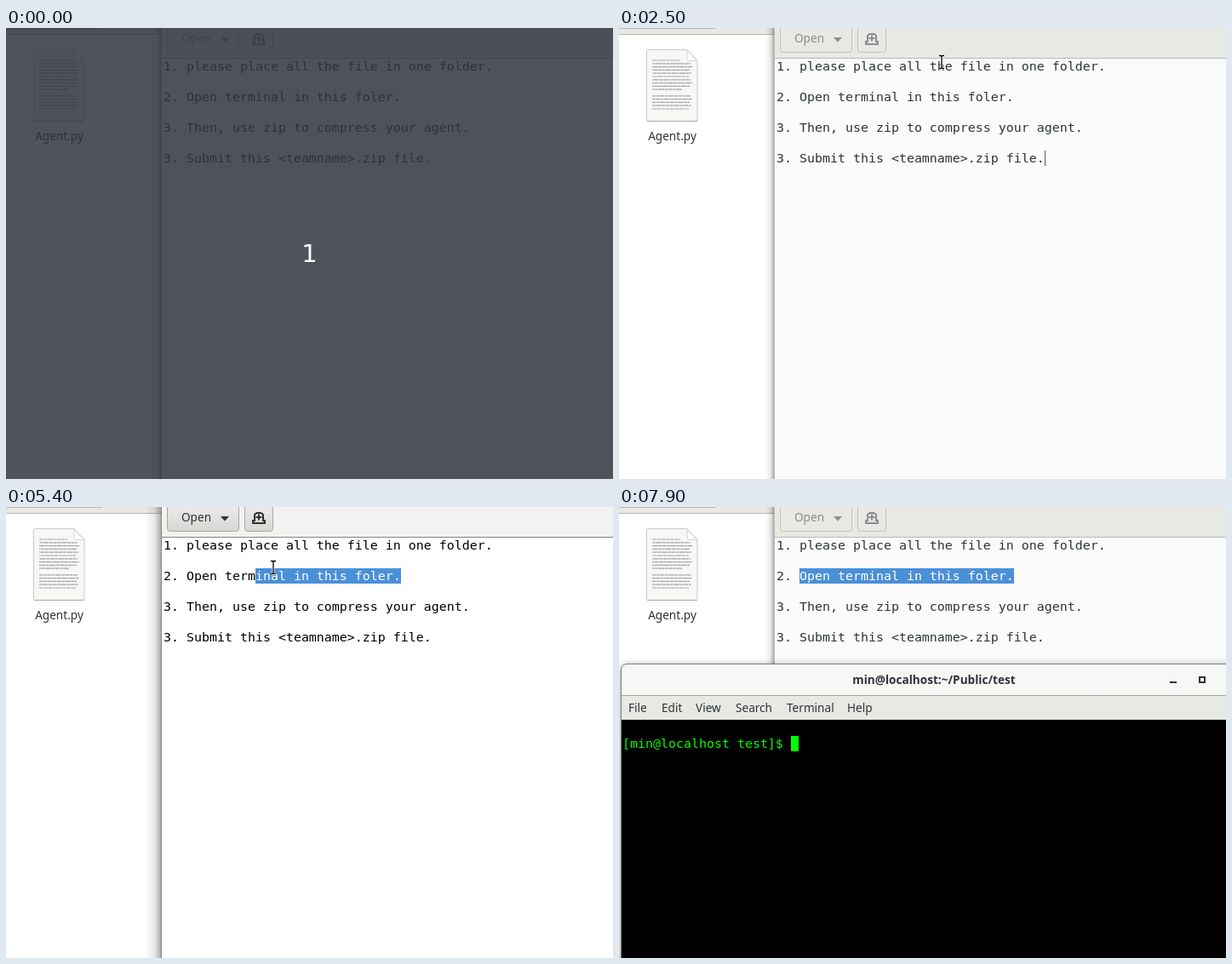
An HTML page for the animation above (8 s loop, 713x530 px).

```html
<!DOCTYPE html>
<html lang="en">
<head>
<meta charset="utf-8">
<title>Zip instructions</title>
<style>
  html, body { margin: 0; width: 100%; height: 100%; overflow: hidden; background: #fff; }
  svg { display: block; }
  text { white-space: pre; }
  .ui { font: 13.6px "Noto Sans", "Open Sans", sans-serif; fill: #2e3436; }
  .bold { font-weight: 700; }
  .mono { font: 14.95px "DejaVu Sans Mono", monospace; }
  .paper { fill: var(--paper); }
  .bar { fill: var(--bar); }
  .edge { fill: var(--edge); }
  .ink { fill: var(--ink); }
  .btn { fill: url(#btnFill); stroke: var(--rim); }
  .label { fill: var(--label); }
  .glyph { fill: none; stroke: var(--label); stroke-width: 2; }
</style>
</head>
<body>
<svg id="stage" width="713" height="530" viewBox="0 0 713 530">
  <defs>
    <linearGradient id="btnFill" x2="0" y2="1">
      <stop offset=".3" style="stop-color:var(--btnTop)"/>
      <stop offset="1" style="stop-color:var(--btnLow)"/>
    </linearGradient>
    <linearGradient id="side">
      <stop offset="0" stop-opacity="0"/>
      <stop offset=".6" stop-opacity=".09"/>
      <stop offset="1" stop-opacity=".32"/>
    </linearGradient>
    <linearGradient id="title" x2="0" y2="1">
      <stop offset="0" stop-color="#f7f7f6"/>
      <stop offset="1" stop-color="#eeeeec"/>
    </linearGradient>
    <filter id="soft" x="-10%" y="-10%" width="120%" height="120%"><feGaussianBlur stdDeviation="5"/></filter>
    <clipPath id="selClip"><path id="selClipPath"/></clipPath>
  </defs>

  <!-- file manager -->
  <rect width="183" height="530" fill="#fff"/>
  <rect width="183" height="7" fill="#e8e8e4"/>
  <rect y="7" width="183" height="1" fill="#b8b8b2"/>
  <rect width="113" height="1" fill="#b8b8b2"/>
  <path d="M32.5 27.5q0-2 2-2H80l12 13V107.500q0 2-2 2H34.500q-2 0-2-2z" fill="#f7f7f5" stroke="#c9c9c6"/>
  <path d="M33 109.500H92" stroke="#aaa"/>
  <path d="M80 26V36q0 2.500 2.500 2.500H91.500z" fill="#fff" stroke="#ccc" stroke-width=".8"/>
  <g id="script" stroke="#a2a2a0" stroke-width="1.200" stroke-dasharray="5 .6 3 .6 7 .6 4 .6"></g>
  <text class="ui" x="62.500" y="132" text-anchor="middle">Agent.py</text>

  <!-- editor -->
  <rect id="sideIdle" x="172" width="10" height="530" fill="url(#side)"/>
  <rect id="sideFocus" x="163" width="19" height="530" fill="url(#side)"/>
  <rect class="paper" x="183" width="530" height="530"/>
  <rect class="bar" x="183" width="530" height="36"/>
  <rect class="edge" x="183" y="35" width="530" height="1"/>
  <rect class="edge" x="182" width="1" height="530"/>
  <rect class="btn" x="189.500" y="-8" width="84" height="36.500" rx="3"/>
  <rect class="btn" x="280.500" y="-8" width="33" height="36.500" rx="3"/>
  <text class="ui label" x="206" y="17">Open</text>
  <path class="label" d="M252 11h10l-5 5.500z"/>
  <path class="glyph" d="M290 20V16H292V9L294.500 7H299.500L302 9V16H304V20M289 19H305M293.500 12H300.500M297 8.500V15.500"/>
  <g id="lines" class="mono ink"></g>
  <path id="selection" fill="#4a90d9"/>
  <g clip-path="url(#selClip)"><use href="#lines" id="whiteLines"/></g>
  <rect id="caret" y="144" x="500" width="1" height="18" fill="#555"/>

  <!-- terminal -->
  <g id="terminal">
    <rect x="2" y="186" width="736" height="500" rx="8" opacity=".4" filter="url(#soft)"/>
    <path d="M2.500 690V192q0-7.500 7.500-7.500H730q7.500 0 7.500 7.500V690z" fill="url(#title)" stroke="#7f7f7c"/>
    <rect x="3" y="221" width="734" height="29" fill="#e8e8e5"/>
    <rect x="3" y="221" width="734" height="1" fill="#a5a5a0"/>
    <rect x="3" y="250" width="734" height="433"/>
    <text class="ui bold" x="370" y="208" text-anchor="middle">min@localhost:~/Public/test</text>
    <path d="M647 205h8v2h-8z" fill="#2e3436"/>
    <rect x="682" y="200" width="6" height="6" fill="none" stroke="#2e3436" stroke-width="2"/>
    <g class="ui">
      <text x="11" y="241">File</text>
      <text x="50" y="241">Edit</text>
      <text x="90" y="241">View</text>
      <text x="137" y="241">Search</text>
      <text x="197" y="241">Terminal</text>
      <text x="268" y="241">Help</text>
    </g>
    <text class="mono" x="4" y="283" fill="#0f0">[min@localhost test]$ </text>
    <rect x="202" y="269" width="9" height="18" fill="#0f0"/>
  </g>

  <g id="pointer" fill="none">
    <path d="M-3-7.500H-1L0-6.500L1-7.500H3M0-6.500V6.500M-3 7.500H-1L0 6.500L1 7.500H3" stroke="#fff" stroke-width="3"/>
    <path d="M-3-7.500H-1L0-6.500L1-7.500H3M0-6.500V6.500M-3 7.500H-1L0 6.500L1 7.500H3" stroke="#000" stroke-width="1.300"/>
  </g>

  <g id="countdown">
    <rect width="713" height="530" fill="#2d3139" opacity=".83"/>
    <text x="356.500" y="275" text-anchor="middle" fill="#fff" font-size="29" font-family="DejaVu Sans, sans-serif">1</text>
  </g>
</svg>
<script>
const LOOP = 8000, STEP = 100;
const CHAR = 9, TEXT_X = 212, ROW = 18;
const $ = id => document.getElementById(id);
const show = (id, on) => $(id).style.display = on ? '' : 'none';

const steps = [
  '1. please place all the file in one folder.',
  '2. Open terminal in this foler.',
  '3. Then, use zip to compress your agent.',
  '3. Submit this <teamname>.zip file.'
];

// idle and focused colours of the editor
const palette = {
  paper: ['fbfbfb', 'ffffff'],
  bar: ['e8e8e4', 'f2f2f1'],
  edge: ['b9b9b3', '858582'],
  ink: ['2e3436', '000000'],
  rim: ['c3c3bd', 'a9a9a4'],
  btnTop: ['e8e8e4', 'e8e8e6'],
  btnLow: ['e8e8e4', 'd6d6d3'],
  label: ['8b8e8f', '2e3436']
};

// pointer keys: time, x, y, optional time until which it rests
const path = [
  [900, 231, 48], [1000, 237, 62, 1600],
  [1700, 265, 66], [1800, 340, 83], [1900, 450, 76], [2000, 519, 71, 2100],
  [2200, 590, 45, 2300], [2400, 480, 42], [2500, 379, 40], [2800, 234, 57, 2900],
  [3000, 600, 57], [3100, 553, 45, 3200], [3300, 440, 53], [3500, 212, 42, 3800],
  [3900, 230, 55], [4100, 270, 90], [4300, 370, 102], [4700, 466, 84],
  [4800, 462, 82], [5400, 314, 71], [5500, 240, 62], [5600, 213, 82],
  [6100, 330, 84], [6500, 432, 80, 6600],
  [6700, 360, 79], [6900, 211, 84], [7500, 270, 395]
];

function pointerAt(t) {
  const i = path.findLastIndex(k => k[0] <= t);
  if (i < 0) return null;
  const [t0, x, y, rest = t0] = path[i];
  const next = path[i + 1];
  if (!next || t <= rest) return [x, y];
  const k = (t - rest) / (next[0] - rest);
  return [x + (next[1] - x) * k, y + (next[2] - y) * k];
}

const snap = x => TEXT_X + CHAR * Math.max(0, Math.round((x - TEXT_X) / CHAR));
const band = (x, y, end) => `M${x} ${y}H${end}V${y + ROW}H${x}z`;

function selectionAt(t) {
  if (t < 3000) return '';
  if (t < 3100) return band(572, 36, 713);
  if (t < 4600) return band(snap(pointerAt(Math.min(t, 3500))[0]), 36, 572);
  if (t < 4800) return '';
  if (t === 5500) return band(184, 54, 713) + band(184, 72, 464);
  return band(snap(pointerAt(Math.min(t, 5600))[0] - 21), 72, 464);
}

function focusAt(t) {
  if (t === 2600 || t === 7700) return 0.5;
  return t > 2600 && t < 7700 ? 1 : 0;
}

function mix(a, b, k) {
  const part = (c, i) => parseInt(c.slice(i, i + 2), 16);
  return `rgb(${[0, 2, 4].map(i => Math.round(part(a, i) + (part(b, i) - part(a, i)) * k))})`;
}

function draw(t) {
  const focus = focusAt(t);
  for (const name in palette)
    $('stage').style.setProperty('--' + name, mix(...palette[name], focus));
  $('sideIdle').style.opacity = 1 - focus;
  $('sideFocus').style.opacity = focus;

  const sel = selectionAt(t);
  $('selection').setAttribute('d', sel);
  $('selClipPath').setAttribute('d', sel);

  show('caret', t >= 2400 && t < 2800);
  show('countdown', t < 100);

  const spot = t < 7600 && pointerAt(t);
  show('pointer', spot);
  if (spot) $('pointer').setAttribute('transform', `translate(${Math.round(spot[0])} ${Math.round(spot[1])})`);

  // the window grows from its bottom centre
  const open = t >= 7900 ? 1 : 1 - 2 ** (-10 * (t - 7700) / 250);
  show('terminal', t > 7700);
  $('terminal').setAttribute('transform', open === 1 ? '' : `translate(370 683) scale(${open}) translate(-370 -683)`);
  $('terminal').style.opacity = Math.max(0, open);
}

function build() {
  const escape = s => s.replace(/</g, '&lt;').replace(/>/g, '&gt;');
  const rows = steps.map((s, i) => `<text x="185" y="${50 + i * 2 * ROW}">${escape(s)}</text>`).join('');
  $('lines').innerHTML = rows;
  $('whiteLines').outerHTML = `<g class="mono" fill="#fff">${rows}</g>`;

  let strokes = '';
  for (let i = 0; i < 16; i++) {
    if (i === 10) continue;
    const end = i === 0 ? 72 : i === 9 ? 74 : 82 + (i * 7) % 5;
    strokes += `<path d="M39 ${38 + i * 3.8}H${end}" stroke-dashoffset="${i * 5}"/>`;
  }
  $('script').innerHTML = strokes;
}

build();
let start = null, last = -1;
function tick(now) {
  start ??= now;
  const t = Math.floor(((now - start) % LOOP) / STEP) * STEP;
  if (t !== last) draw(last = t);
  requestAnimationFrame(tick);
}
draw(0);
requestAnimationFrame(tick);
</script>
</body>
</html>
```
